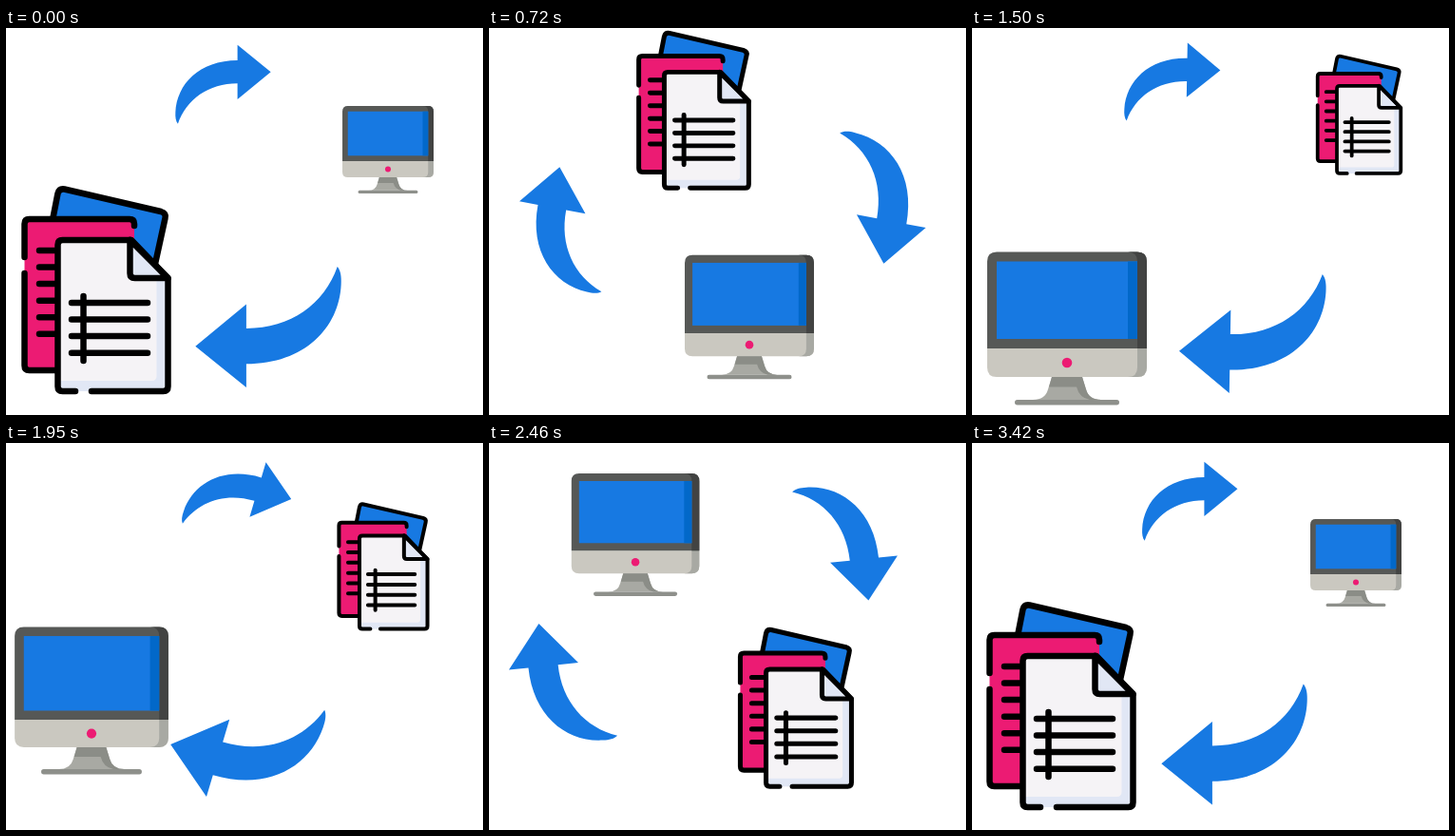
An HTML page for the animation above (3600 ms loop, 502 by 407 pixels).

```html
<!DOCTYPE html>
<html lang="en">
<head>
<meta charset="utf-8">
<title>Paper to digital cycle</title>
<style>
html, body { margin: 0; width: 100%; height: 100%; overflow: hidden; background: #fff; }
svg { display: block; width: 502px; height: 407px; }
</style>
</head>
<body>
<svg viewBox="0 0 502 407" xmlns="http://www.w3.org/2000/svg">
  <defs>
    <path id="arrow" fill="#1779e2" d="M78 -20 L23.5 25 V-1 C-24 -1 -60 25 -74 65 C-77.5 61 -78.5 54 -78 46 C-76 0 -39 -39 23.5 -39 V-64 Z"/>
  </defs>
  <use id="right" href="#arrow"/>
  <use id="left" href="#arrow"/>

  <g id="screen">
    <g transform="translate(-100 -316)">
      <path fill="#cac8c0" d="M16 337 H184 V357 Q184 367 174 367 H26 Q16 367 16 357 Z"/>
      <path fill="#a8a9a3" d="M174 337 H184 V357 Q184 367 174 367 H164 Q174 367 174 357 Z"/>
      <path fill="#565856" d="M16 337 V245.5 Q16 235.5 26 235.5 H174 Q184 235.5 184 245.5 V337 Z"/>
      <path fill="#424342" d="M164 235.5 H174 Q184 235.5 184 245.5 V337 H174 V245.5 Q174 235.5 164 235.5 Z"/>
      <rect x="26" y="245.5" width="148" height="81.5" fill="#1779e2"/>
      <rect x="164" y="245.5" width="10" height="81.5" fill="#0268c9"/>
      <circle cx="100" cy="352" r="5.3" fill="#ec1b73"/>
      <path fill="#a8a9a3" d="M84 367 H116 L120 380 Q123 391 136 391 H64 Q77 391 80 380 Z"/>
      <path fill="#8b8d87" d="M84 367 H116 L120 380 Q123 391 136 391 H124 Q113 389 110 377.5 H81 Z"/>
      <rect x="45" y="391" width="110" height="5.5" rx="2.7" fill="#8e908b"/>
    </g>
  </g>

  <g id="docs">
    <g transform="translate(-95 -276)" fill="none" stroke="#000" stroke-width="6.5" stroke-linecap="round" stroke-linejoin="round">
      <path fill="#1779e2" d="M49 202 L54.5 174 Q56 168.500 61.500 169.500 L163 193 Q169 195 167.500 200 L157 248"/>
      <path fill="#ec1b73" stroke="none" d="M19.5 206 Q19.5 201 24.5 201 H135 V360 H24.5 Q19.5 360 19.5 355 Z"/>
      <path d="M135 208 V206 Q135 201 130 201 H24.5 Q19.5 201 19.5 206 V241 M19.5 258 V355 Q19.5 360 24.5 360 H54"/>
      <g id="notes"></g>
      <path fill="#f5f3f6" stroke="none" d="M59.5 223 H132 L170.5 263 V377 Q170.5 382 165.5 382 H59.5 Q54.5 382 54.5 377 V228 Q54.5 223 59.5 223 Z"/>
      <path fill="#e1e7f5" stroke="none" d="M158.5 263 H170.5 V377 Q170.5 382 165.5 382 H54.5 V371 H153.5 Q158.5 371 158.5 366 Z"/>
      <path fill="#e1e7f5" d="M130.5 223 V258 Q130.5 263 135.5 263 H170.5 Z"/>
      <path d="M90 382 H165.5 Q170.5 382 170.5 377 V263 L132 223 H59.5 Q54.5 223 54.5 228 V377 Q54.5 382 59.5 382 H73"/>
      <g id="rows"></g>
      <path d="M81.5 282 V350"/>
    </g>
  </g>
</svg>
<script>
const LOOP = 3600, STEP = 30, LAST = 3420;

// Each loop is two half turns with a rest after each.
// knots: share of the half turn at which a waypoint is reached.
const halves = [
  { start: 0, span: 1295, knots: [0, .25, .556, .8, 1], turn: [0, 181] },
  { start: 1832, span: 1353, knots: [0, .087, .464, .775, 1], turn: [181, 360] }
];

// Waypoints of a full turn, the middle one shared by both halves;
// size goes from first to second value and back.
const parts = {
  docs: { size: [1, .58], way: "95,276 121,173 215.5,87 322,79 407.5,91.5 397,130 323,279 191.3,297 94,277" },
  screen: { size: [.571, 1], way: "402,128 363,219 274,304 177,328 100,316 90,271 154,96.5 305.5,69.5 404,126" },
  right: { size: [.643, .983], arrow: 0, way: "228.5,59 325,88 411,181 386,285 295,321.5 250,320 75.5,252.5 106.8,98 229.3,61" },
  left: { size: [.983, .643], arrow: 180, way: "276,315 172,300 78.5,210 118,95 211,56.5 246,57 377,105 379.5,251.5 276,317.5" }
};

const byId = id => document.getElementById(id);
const mix = ([a, b], p) => a + (b - a) * p;
const clamp = v => Math.min(1, Math.max(0, v));

for (const part of Object.values(parts)) part.way = part.way.split(" ").map(s => s.split(",").map(Number));

function ruleLines(id, count, x1, x2, y) {
  let d = "";
  for (let i = 0; i < count; i++) d += `M${x1} ${y + i * 17.55} H${x2} `;
  byId(id).innerHTML = `<path d="${d}"/>`;
}

// Smooth polynomial through the waypoints.
function along(points, knots, p) {
  let x = 0, y = 0;
  points.forEach(([px, py], i) => {
    const w = knots.reduce((m, k, j) => j === i ? m : m * (p - k) / (knots[i] - k), 1);
    x += w * px;
    y += w * py;
  });
  return [x, y];
}

function draw(ms) {
  const t = Math.min(LAST, Math.floor(ms % LOOP / STEP) * STEP);
  const n = t < halves[1].start ? 0 : 1;
  const { start, span, knots, turn } = halves[n];
  const p = clamp((t - start) / span);
  for (const [id, { size, way, arrow }] of Object.entries(parts)) {
    const [x, y] = along(way.slice(n * 4, n * 4 + 5), knots, p);
    const angle = arrow === undefined ? 0 : arrow + mix(turn, p);
    const scale = mix(size, n ? 1 - p : p);
    byId(id).setAttribute("transform",
      `translate(${x.toFixed(2)} ${y.toFixed(2)}) rotate(${angle.toFixed(2)}) scale(${scale.toFixed(4)})`);
  }
}

let begin;
function tick(now) {
  if (begin === undefined) begin = now;
  draw(now - begin);
  requestAnimationFrame(tick);
}

ruleLines("notes", 6, 35, 55, 234);
ruleLines("rows", 4, 69, 149, 289);
draw(0);
requestAnimationFrame(tick);
</script>
</body>
</html>
```
